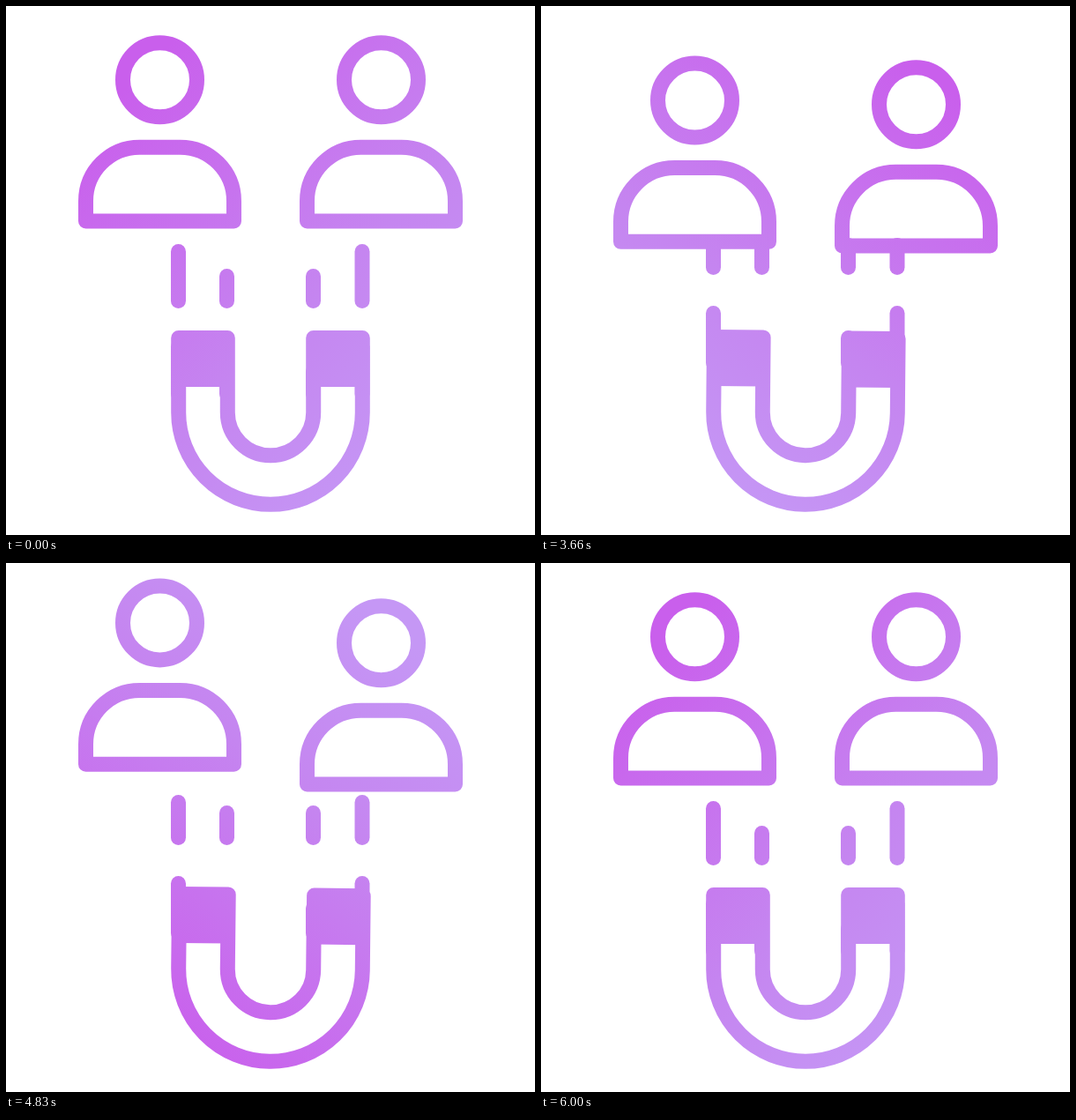
Animation of 600 by 600 pixels, one loop 6.03 s. Source, as an HTML page with a canvas:

```html
<!DOCTYPE html>
<html lang="en">
<head>
<meta charset="utf-8">
<title>Magnet attracting people</title>
<style>
html, body { margin: 0; width: 100%; height: 100%; overflow: hidden; background: #fff; }
canvas { display: block; width: 600px; height: 600px; }
</style>
</head>
<body>
<canvas id="stage" width="600" height="600"></canvas>
<script>
const ctx = document.getElementById('stage').getContext('2d');
const LOOP = 6030, REST = 3000, ACTIVE = 3000, STEP = 30;
const SHAKE_PERIOD = 134.5;
const DASH_PERIOD = 108, DASH_TOP = 271.5, DASH_END = 440, DASH_FOOT = 334.5;

// Keys are [ms since the motion began, value].
const leftBob = [[0, 0], [900, 28], [1745, -17], [2450, 17], [3000, 0]];
const rightBob = [[0, 0], [600, 29], [1300, -21], [2100, 16.6], [3000, 0]];
const dashTravel = [[0, 0], [30, 5], [360, 82], [960, 274], [1830, 517], [2520, 734], [3000, 864]];
const gradientTurn = [[0, 0], [150, 6], [360, 27], [960, 130], [1830, 265], [2520, 347], [3000, 360]];

const linear = p => p;
const sine = p => (1 - Math.cos(Math.PI * p)) / 2;

function sample(keys, t, ease) {
  let i = 1;
  while (i < keys.length - 1 && t > keys[i][0]) i++;
  const [t0, a] = keys[i - 1], [t1, b] = keys[i];
  return a + (b - a) * ease((t - t0) / (t1 - t0));
}

function makePaint(degrees) {
  const angle = (225 + degrees) * Math.PI / 180;
  const x = 265 * Math.cos(angle), y = 265 * Math.sin(angle);
  const paint = ctx.createLinearGradient(300 + x, 303 + y, 300 - x, 303 - y);
  paint.addColorStop(0, '#c95fec');
  paint.addColorStop(0.6, '#c585f0');
  paint.addColorStop(1, '#c597f5');
  return paint;
}

function drawPerson(x, dy) {
  const y = 83.7 + dy, base = 244 + dy, top = 160.2 + dy;
  ctx.beginPath();
  ctx.arc(x, y, 42, 0, 2 * Math.PI);
  ctx.stroke();
  ctx.beginPath();
  ctx.moveTo(x - 84, base);
  ctx.lineTo(x - 84, top + 61);
  ctx.arc(x - 23, top + 61, 61, Math.PI, 1.5 * Math.PI);
  ctx.arc(x + 23, top + 61, 61, 1.5 * Math.PI, 2 * Math.PI);
  ctx.lineTo(x + 84, base);
  ctx.closePath();
  ctx.stroke();
}

function drawDashes(x, length, travel) {
  const first = DASH_FOOT + travel % DASH_PERIOD - DASH_PERIOD;
  for (let foot = first; foot - length < DASH_END; foot += DASH_PERIOD) {
    if (foot <= DASH_TOP) continue;
    ctx.beginPath();
    ctx.moveTo(x, Math.max(DASH_TOP, foot - length));
    ctx.lineTo(x, Math.min(DASH_END, foot));
    ctx.stroke();
  }
}

// The magnet pivots about the centre of its arc; the paint stays fixed to the stage.
function drawMagnet(degrees) {
  const turn = new DOMMatrix().translate(300, 461).rotate(degrees);
  const outer = 104.3, inner = 48.7, top = -84.5;
  const outline = new Path2D(), poles = new Path2D(), placed = new Path2D(), blocks = new Path2D();
  outline.moveTo(-outer, top);
  outline.lineTo(-inner, top);
  outline.lineTo(-inner, 0);
  outline.arc(0, 0, inner, Math.PI, 0, true);
  outline.lineTo(inner, top);
  outline.lineTo(outer, top);
  outline.lineTo(outer, 0);
  outline.arc(0, 0, outer, 0, Math.PI);
  outline.closePath();
  poles.rect(-outer, top, outer - inner, 55.5);
  poles.rect(inner, top, outer - inner, 55.5);
  placed.addPath(outline, turn);
  blocks.addPath(poles, turn);
  ctx.fill(blocks);
  ctx.stroke(placed);
}

function draw(now) {
  const t = Math.floor((now % LOOP) / STEP) * STEP - REST;
  const u = t > 0 && t < ACTIVE ? t : 0;
  const travel = sample(dashTravel, u, linear);
  ctx.fillStyle = '#fff';
  ctx.fillRect(0, 0, 600, 600);
  ctx.fillStyle = ctx.strokeStyle = makePaint(sample(gradientTurn, u, linear));
  ctx.lineWidth = 17;
  ctx.lineCap = ctx.lineJoin = 'round';
  drawPerson(174.5, sample(leftBob, u, sine));
  drawPerson(425.5, sample(rightBob, u, sine));
  drawDashes(195.5, 56, travel);
  drawDashes(250.5, 28, travel);
  drawDashes(348.5, 28, travel);
  drawDashes(404, 56, travel);
  drawMagnet(-Math.sin(2 * Math.PI * u / SHAKE_PERIOD));
}

const start = performance.now();
function tick() {
  draw(performance.now() - start);
  requestAnimationFrame(tick);
}
tick();
</script>
</body>
</html>
```
